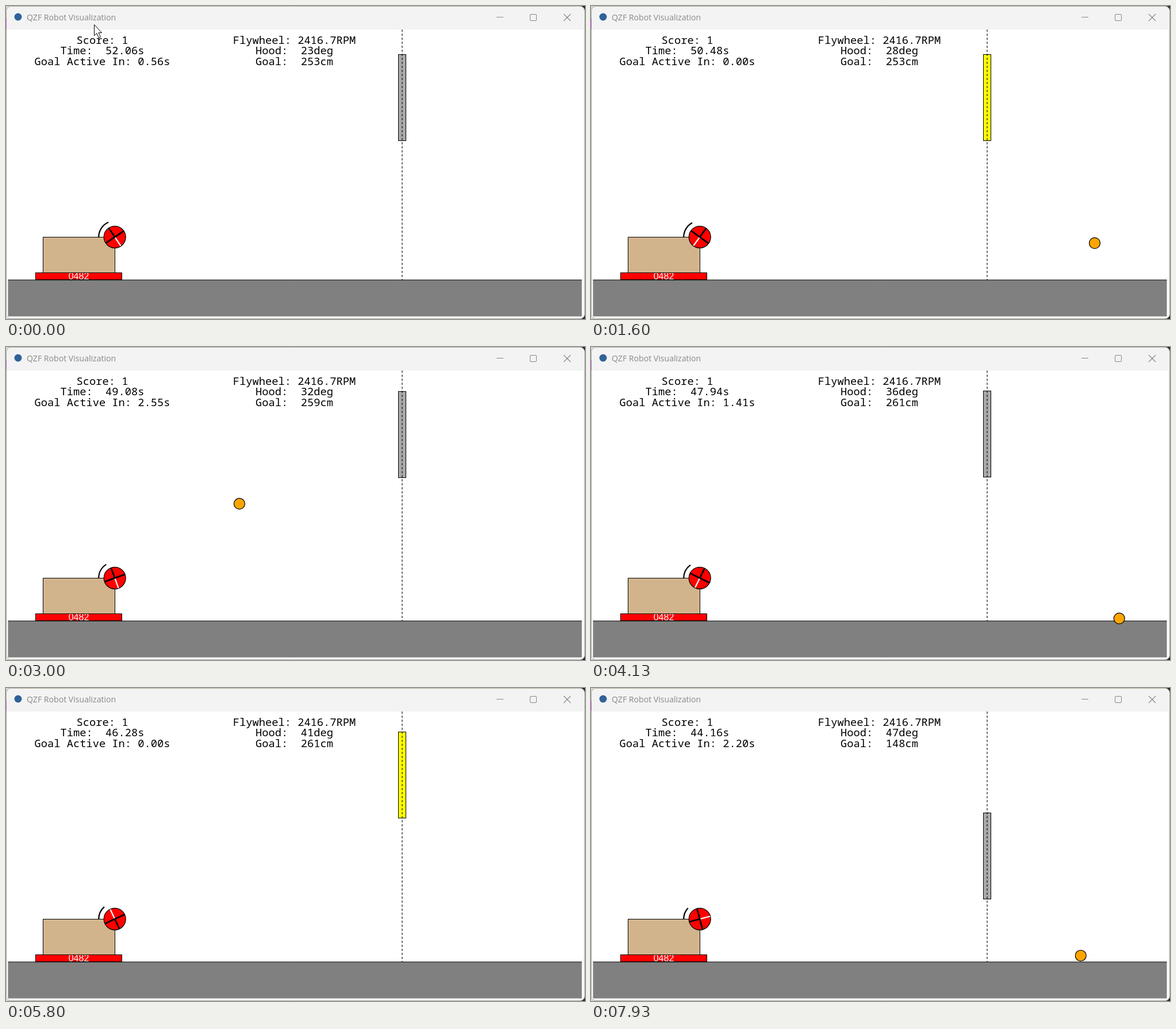
These frames come from a looping animation (1007x545 px, 8 s). An HTML page with a canvas:

```html
<!DOCTYPE html>
<html lang="en">
<head>
<meta charset="utf-8">
<title>Robot Visualization</title>
<style>
  html, body { margin: 0; width: 100%; height: 100%; overflow: hidden; background: #d9d9d4; }
  canvas { display: block; }
</style>
</head>
<body>
<canvas id="stage" width="1007" height="545"></canvas>
<script>
const ctx = document.getElementById('stage').getContext('2d');
const LOOP = 8000, STEP = 200 / 3;
const MONO = '18.75px "Noto Sans Mono", "DejaVu Sans Mono", monospace';
const WHEEL = { x: 189.2, y: 402.3, r: 19, hood: 28 };

// [seconds, match clock, wheel angle in degrees]
const KEYS = [
  [0, 52.06, 56], [1.6, 50.48, 126], [3, 49.08, 70], [4.1333, 47.94, 116],
  [5.8, 46.28, 245], [7, 45.06, 143], [7.9333, 44.16, 345]
];
const TURN = 246.8; // visible wheel turn per step

const DRAG = 1.08, FLOOR = 475, HOP = 0.1246;
const SHOTS = [
  { start: 0.4325, x: 176, y: 377, vx: 1055, g: 623, slope: 0.364, roll: 160 },
  { start: 2.7434, x: 174, y: 377, vx: 1035, g: 820, slope: 0.555, roll: 155 },
  { start: 5.8754, x: 170, y: 381, vx: 926, g: 1000, slope: 0.776, roll: 36 }
];

function flight(s, t) {
  const e = 1 - Math.exp(-DRAG * t);
  const dx = s.vx * e / DRAG;
  return [s.x + dx, s.y + s.g * (t / DRAG - e / DRAG ** 2) - s.slope * dx];
}

for (const s of SHOTS) {
  s.land = 0.3;
  while (flight(s, s.land)[1] < FLOOR) s.land += 0.001;
}

function ballAt(t) {
  const s = SHOTS.filter(shot => shot.start <= t).pop();
  if (!s) return null;
  const age = t - s.start;
  if (age < s.land) return flight(s, age);
  const u = age - s.land;
  const x = flight(s, s.land)[0] + s.roll / 0.8 * (1 - Math.exp(-0.8 * u));
  return x > 1014 ? null : [x, FLOOR - 9 * Math.abs(Math.sin(Math.PI * u / HOP))];
}

function segment(t) {
  let i = 0;
  while (i < KEYS.length - 2 && t >= KEYS[i + 1][0]) i++;
  const a = KEYS[i], b = KEYS[i + 1];
  return [a, b, (t - a[0]) / (b[0] - a[0])];
}

function clockAt(t) {
  const [a, b, p] = segment(t);
  return a[1] + (b[1] - a[1]) * p;
}

function wheelAt(t) {
  const [a, b, p] = segment(t);
  const free = (b[0] - a[0]) * 1000 / STEP * TURN;
  const gap = b[2] - a[2];
  return a[2] + (gap + 360 * Math.round((free - gap) / 360)) * p;
}

function hoodAt(t) {
  return 23.05 + 3.04 * t;
}

function goalAt(t) {
  const ease = from => 1 - Math.exp(-4.13 * Math.max(0, t - from));
  return 253.45 + 7.1 * ease(2.55) - 116.6 * ease(7.1);
}

function rect(x, y, w, h, fill) {
  ctx.fillStyle = fill;
  ctx.fillRect(x, y, w, h);
}

function boxed(x, y, w, h, fill) {
  rect(x, y, w, h, fill);
  ctx.strokeStyle = '#000';
  ctx.lineWidth = 1;
  ctx.strokeRect(x + 0.5, y + 0.5, w, h);
}

function disc(x, y, r, fill, edge) {
  ctx.beginPath();
  ctx.arc(x, y, r, 0, 2 * Math.PI);
  ctx.fillStyle = fill;
  ctx.fill();
  if (!edge) return;
  ctx.strokeStyle = edge;
  ctx.lineWidth = 1.2;
  ctx.stroke();
}

function line(x1, y1, x2, y2, color, width) {
  ctx.beginPath();
  ctx.moveTo(x1, y1);
  ctx.lineTo(x2, y2);
  ctx.strokeStyle = color;
  ctx.lineWidth = width;
  ctx.stroke();
}

function label(text, x, y, font, color, align) {
  ctx.font = font;
  ctx.fillStyle = color;
  ctx.textAlign = align;
  ctx.fillText(text, x, y);
}

function block(lines, x) {
  lines.forEach((text, i) => label(text, x, 65.5 + 18.8 * i, MONO, '#000', 'center'));
}

function drawWindow() {
  rect(0, 0, 1007, 545, '#d9d9d4');
  rect(990, 0, 17, 545, '#2a2a2a');
  ctx.beginPath();
  ctx.roundRect(0.5, 0.5, 1006, 544, 8);
  ctx.fillStyle = '#f3f3f3';
  ctx.fill();
  ctx.strokeStyle = '#aaa99a';
  ctx.lineWidth = 1;
  ctx.stroke();
  rect(0, 22, 1, 18, '#c04fc0');
  rect(2, 41, 1002, 501, '#fff');

  disc(21, 19, 6.5, '#2f6299');
  label('QZF Robot Visualization', 36, 25, '14.1px "Open Sans", "Noto Sans", sans-serif', '#898989', 'left');
  const grey = '#858585';
  line(853, 19.5, 865, 19.5, grey, 1);
  ctx.beginPath();
  ctx.roundRect(911.5, 14.5, 11, 11, 1.5);
  ctx.stroke();
  line(970, 14, 982, 26, grey, 1.1);
  line(982, 14, 970, 26, grey, 1.1);
}

function drawRobot(t) {
  boxed(51, 464, 150, 12, '#f00');
  label('0482', 126.5, 476, '16px "Liberation Sans", Arial, sans-serif', '#fff', 'center');
  boxed(64, 402, 125, 62, '#d2b48c');

  const { x, y, r, hood } = WHEEL;
  ctx.beginPath();
  ctx.arc(x, y, hood, Math.PI, Math.PI * 1.5 - hoodAt(t) * Math.PI / 180);
  ctx.strokeStyle = '#000';
  ctx.lineWidth = 2.2;
  ctx.stroke();

  disc(x, y, r, '#f00', '#000');
  for (const i of [0, 1, 2, 3]) {
    const a = (wheelAt(t) + 90 * i) * Math.PI / 180;
    line(x, y, x + 18.5 * Math.cos(a), y + 18.5 * Math.sin(a), i ? '#000' : '#fff', i ? 2.7 : 2.2);
  }
}

function drawField(t, active) {
  rect(3.5, 477, 998, 63.5, '#808080');
  line(3.5, 477, 1001.5, 477, '#000', 1);
  boxed(682, Math.round(401.25 - 1.25 * goalAt(t)), 13, 150, active ? '#ff0' : '#a9a9a9');
  ctx.setLineDash([4, 3]);
  line(689, 41, 689, 477, '#000', 1.1);
  ctx.setLineDash([]);
}

function drawCursor(x, y) {
  ctx.save();
  ctx.translate(x + 0.5, y + 0.5);
  ctx.fillStyle = '#fff';
  ctx.strokeStyle = '#000';
  ctx.lineWidth = 1;
  const tip = new Path2D('M0 0V19L4.5 15L8 23L11 21.5L7.5 14H13Z');
  ctx.fill(tip);
  ctx.stroke(tip);
  ctx.restore();
}

function draw(step) {
  const t = step * STEP / 1000;
  const clock = clockAt(t);
  const next = clock > 49.53 ? 51.5 : clock > 44.96 ? 46.53 : 41.96;
  const wait = Math.max(0, clock - next);

  drawWindow();
  ctx.save();
  ctx.beginPath();
  ctx.rect(2, 41, 1002, 501);
  ctx.clip();
  drawField(t, wait === 0);
  drawRobot(t);
  block(['Score: 1', `Time:  ${clock.toFixed(2)}s`, `Goal Active In: ${wait.toFixed(2)}s`], 167.5);
  block(['Flywheel: 2416.7RPM', `Hood:  ${hoodAt(t).toFixed(0)}deg`, `Goal:  ${goalAt(t).toFixed(0)}cm`], 501.5);
  const ball = ballAt(t);
  if (ball) disc(ball[0], ball[1], 9.5, '#ffa500', '#000');
  ctx.restore();

  if (step === 0) drawCursor(153, 32);
  if (step === 1) drawCursor(148, 29);
}

function tick() {
  const ms = performance.now() % LOOP;
  draw(Math.floor((ms + 4) / STEP) % 120);
  requestAnimationFrame(tick);
}
tick();
</script>
</body>
</html>
```
